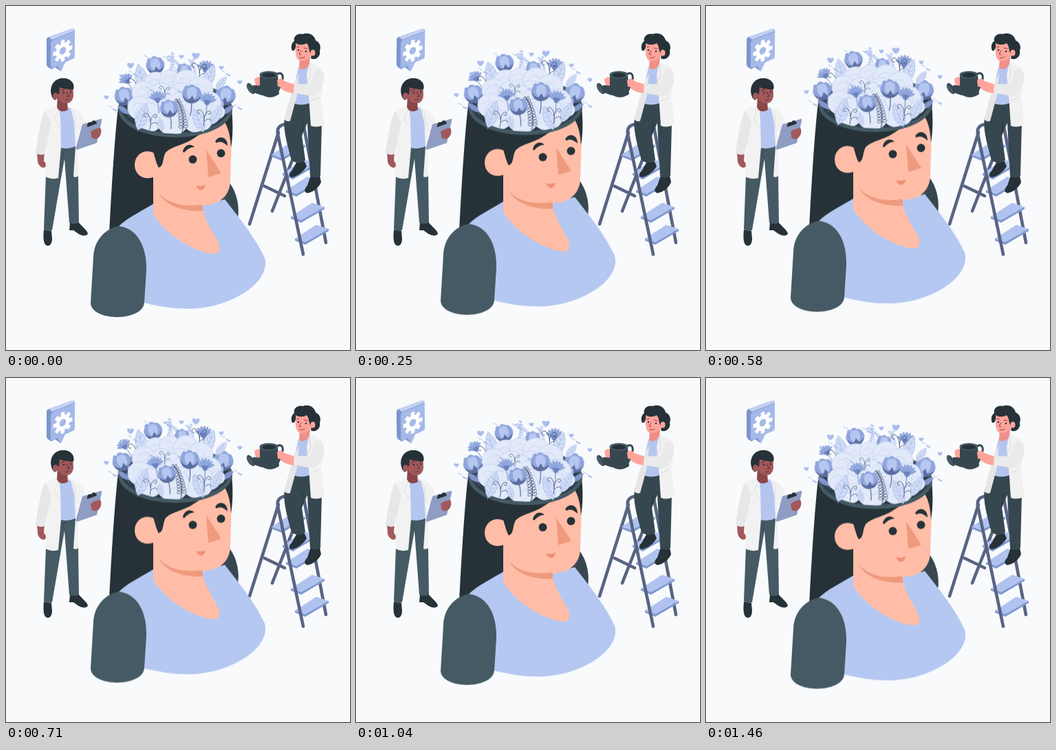
An HTML page that plays this animation: 500 by 500 pixels, repeating every 1.5 s.

```html
<!DOCTYPE html>
<html lang="en">
<head>
<meta charset="utf-8">
<title>Growing mind</title>
<style>
html, body { margin: 0; width: 100%; height: 100%; overflow: hidden; background: #f8fafc; }
svg { display: block; width: 100vw; height: 100vh; }
.line { fill: none; stroke-linecap: round; stroke-linejoin: round; }
#bubble { transform-origin: 80px 64px; }
</style>
</head>
<body>
<svg viewBox="0 0 500 500">
<defs>
  <clipPath id="bowl"><path d="M165 60H326V150A77 35 0 0 1 169 150Z"/></clipPath>
  <g id="tulip">
    <path class="line" d="M0 9Q2 18 0 30" stroke="#566a9c" stroke-width="1.2"/>
    <path d="M-11-7C-17 1-12 10 0 11C12 10 17 1 11-7C8-13 5-9 4-11C0-15-4-13-5-10C-8-13-11-11-11-7Z" fill="#8fa5db"/>
    <path d="M-6-7C-9 1-5 8 0 8C6 8 9 1 6-7C3-11-3-11-6-7Z" fill="#b5c7f0"/>
    <path d="M-12 2C-12 10-5 13 0 13C6 13 12 9 12 2C9 7 6 8 4 8L1 2L-3 8C-6 8-9 7-12 2Z" fill="#5c6d9e"/>
  </g>
  <g id="fan"></g>
  <g id="leaf">
    <path d="M0 20C-13 9-9-9 0-20C9-9 13 9 0 20Z" fill="#d3def7" stroke="#a5b8e6" stroke-width=".8"/>
    <path class="line" d="M0 22V-16M-7 2L0 8L7 2M-6-5L0 1L6-5M-4-11L0-7L4-11M-6 9L0 14L6 9" stroke="#a5b8e6" stroke-width=".7"/>
  </g>
  <g id="fern"></g>
  <g id="sprig"></g>
  <path id="heart" d="M0 4C-8-1-5-7 0-3C5-7 8-1 0 4Z" fill="#a9bcec"/>
  <path id="curl" class="line" d="M0 18C4 4-1-7-6-8C-12-8-10 0-6-2M1 6C3-4 8-8 11-5C13-1 8 1 7-2M2 10C8 5 13 7 12 10" stroke="#3c4b70" stroke-width=".9"/>
  <g id="base">
    <path d="M0 8C-6-4-16-7-20-5C-16 4-9 9 0 8Z" fill="#7f95cc"/>
    <path d="M2 8C-5-3-6-9-3-14C4-8 6 0 2 8Z" fill="#a9bcec"/>
  </g>
</defs>

<!-- speech bubble -->
<g id="bubble">
  <path d="M59 49Q59 46 62 45L96 33Q98 32 100 35L98 74L66 92L61 89Q59 87 59 85Z" fill="#7d94cb"/>
  <path d="M62 45L96 33Q98 32 100 36L67 49Z" fill="#c2d0f3"/>
  <path d="M69 49L97 38Q100 36 100 40V73Q100 76 97 77L86 82L80 95L75 87L68 90Q65 91 65 88V54Q65 51 69 49Z" fill="#a5b9e9"/>
  <path d="M75 87L80 95L77 93L71 89Z" fill="#7d94cb"/>
  <g id="gear" transform="matrix(.9 -.34 0 1 82.5 65)"></g>
</g>

<!-- man with clipboard -->
<g>
  <path d="M55 325L66 327L67 338C67 346 63 350 59 348C54 346 54 336 55 325ZM93 314L106 315C111 321 118 326 119 331C117 335 110 334 105 331L98 326L92 326Z" fill="#263238"/>
  <path d="M58 246L55 324Q60 329 67 326L80 250L85 222L92 315Q99 318 106 315L105 250L101 203L78 205Z" fill="#455a64"/>
  <path class="line" d="M85 222L82 213L89 209" stroke="#37474f" stroke-width="1"/>
  <path d="M45 212L46 226C47 232 53 237 57 234L60 232L55 225L56 212Z" fill="#a1595b"/>
  <path d="M78 152L93 147L103 164L101 204Q90 209 79 206Z" fill="#b4c6f0"/>
  <path d="M94 148C106 150 112 158 116 170L127 183L121 193L104 182L105 247Q102 250 98 248L101 204L99 168Z" fill="#f1f1f1"/>
  <path d="M74 145C62 147 54 152 52 165L43 213Q49 218 56 215L59 200L57 248Q66 253 76 250L80 205L79 165L77 148Z" fill="#f2f2f2"/>
  <path d="M57 152C50 164 47 190 43 213Q49 218 56 215L66 170Z" fill="#e7e7e7"/>
  <path class="line" d="M77 148L70 164L79 178M92 147L100 158L101 180" stroke="#dedede" stroke-width="1"/>
  <path d="M75 130L74 147Q78 157 90 151L89 138Z" fill="#8a4648"/>
  <path d="M74 114L97 111L98 129C98 139 91 143 85 141C77 140 73 132 74 114Z" fill="#a1595b"/>
  <path d="M66 129C62 113 74 104 83 105C94 104 101 114 98 121C90 121 84 121 78 118L77 128L73 130L72 137Q67 135 66 129Z" fill="#263238"/>
  <ellipse cx="72" cy="131" rx="4" ry="5" fill="#a1595b"/>
  <path class="line" d="M81 123L85 121M92 121L96 122M88 125L92 131L89 132M86 137L91 136" stroke="#5f2f33" stroke-width="1.1"/>
  <circle cx="84" cy="126" r="1.2" fill="#263238"/><circle cx="94" cy="125" r="1.2" fill="#263238"/>
  <path d="M111 172L138 164Q140 164 139 167L132 199L103 209Q101 208 102 205Z" fill="#8f9dc4"/>
  <path d="M118 173L120 169L124 169L127 166L131 168L132 171L118 176Z" fill="#263238"/>
  <path d="M123 183C127 179 133 178 137 177C140 182 138 190 132 193C127 194 123 192 124 188Z" fill="#a1595b"/>
</g>

<!-- ladder -->
<g class="line" stroke="#596482" stroke-width="4.6">
  <path d="M396 184L354 317M424 204L387 298M376 262L405 276"/>
  <path d="M430 160L465 344" />
</g>
<g id="steps"></g>
<path class="line" d="M432 361L395 186Q393 174 405 172L430 165" stroke="#596482" stroke-width="4.6"/>

<!-- woman with watering can -->
<g>
  <path d="M424 224L434 226L437 233C434 239 425 247 416 249C410 248 411 243 415 240ZM443 246L456 247L458 256C455 264 446 271 438 272C432 270 434 265 438 261Z" fill="#263238"/>
  <path d="M417 137L405 163C402 177 409 203 415 224Q426 232 435 224L430 188L438 170L442 247Q449 252 457 247L459 170L450 140Z" fill="#37474f"/>
  <path class="line" d="M430 188L432 168" stroke="#263238" stroke-width="1"/>
  <path d="M425 89L441 83L444 140Q428 147 416 140L420 112Z" fill="#b4c6f0"/>
  <path d="M420 110L411 139L404 165Q409 169 413 167L423 130L426 98Z" fill="#e6e6e6"/>
  <path d="M441 82C455 86 462 91 463 103L458 132L463 172Q452 178 443 174L440 130L437 100Z" fill="#f1f1f1"/>
  <path d="M398 108C406 108 414 113 421 114L421 126C411 128 402 122 397 118Z" fill="#ffa49b"/>
  <path d="M419 113L442 114L449 94C455 88 464 95 462 107C460 121 453 130 444 131L418 126Z" fill="#eaeaea"/>
  <path class="line" d="M441 83L443 101L436 114M455 133L444 138" stroke="#d9d9d9" stroke-width="1"/>
  <path d="M427 74L426 90Q434 96 441 84L443 66Z" fill="#f08e88"/>
  <path d="M421 55C420 67 421 79 428 80C437 81 444 75 446 63L443 52Z" fill="#ffa49b"/>
  <path d="M416 65C413 58 416 53 419 51C417 44 425 39 431 41C440 37 449 43 450 50C457 53 458 60 456 65C458 73 450 80 443 76L444 70C439 66 442 60 437 54C432 57 426 57 421 54C422 60 420 66 416 65Z" fill="#263238"/>
  <ellipse cx="446" cy="68" rx="3.5" ry="4.5" fill="#ffa49b"/>
  <path class="line" d="M423 60L426 59M433 61L438 62M429 65L426 70L429 71M427 75Q431 77 434 74" stroke="#8c3f40" stroke-width="1"/>
  <circle cx="425" cy="64" r="1.2" fill="#263238"/><circle cx="436" cy="66" r="1.2" fill="#263238"/>
  <path d="M361 107C364 102 370 102 374 107L372 120L364 120Z" fill="#ffa49b"/>
  <path class="line" d="M394 99C401 95 405 101 400 112L396 122" stroke="#37474f" stroke-width="3"/>
  <path d="M369 100V127Q383 138 397 128L395 100Z" fill="#37474f"/>
  <path d="M372 116L359 115L358 125L372 130Z" fill="#37474f"/>
  <ellipse cx="356" cy="120" rx="4" ry="9" transform="rotate(-32 356 120)" fill="#37474f"/>
  <ellipse cx="354.500" cy="121" rx="3" ry="7.500" transform="rotate(-32 354 121)" fill="#455a64"/>
  <ellipse cx="382" cy="100" rx="13.500" ry="5.500" fill="#455a64"/>
  <ellipse cx="382" cy="100.500" rx="10" ry="3.600" fill="#263238"/>
  <path d="M394 108Q399 103 404 108L404 119L395 117Z" fill="#ffa49b"/>
</g>

<!-- bust -->
<g id="bust">
  <path d="M324 256C334 268 340 289 337 308L310 286Z" fill="#37474f"/>
  <path d="M163 148C159 180 154 250 150 330L220 330V160Z" fill="#263238"/>
  <path d="M162 322C178 306 198 298 215 287L286 290L318 281C334 302 360 332 376 366C386 402 325 440 265 440Q232 440 195 430Z" fill="#b5c8f1"/>
  <path d="M214 230V303C236 338 282 360 302 360C314 359 312 348 304 335C294 317 287 305 285 290L284 240Z" fill="#ffbda7"/>
  <path d="M222 272C236 288 262 293 286 288V298C258 299 233 291 222 272Z" fill="#ee9a7d"/>
  <path d="M214 160H324C327 185 328 200 327 222L326 256C324 282 302 291 284 289C256 288 228 280 214 252Z" fill="#ffbda7"/>
  <path d="M217 215C205 206 187 214 187 231C187 248 205 255 217 247Z" fill="#ffbda7"/>
  <path d="M163 150C180 190 214 190 214 212C217 222 219 230 222 235C230 232 227 222 232 213C242 203 258 203 275 191C289 181 304 176 314 164C320 170 326 182 327 206C330 190 330 170 328 150Z" fill="#263238"/>
  <path d="M257 212C258 203 267 198 274 205C267 205 263 209 259 213ZM304 197C309 187 322 190 322 203C316 198 311 196 306 199Z" fill="#263238"/>
  <circle cx="271.500" cy="223" r="6" fill="#263238"/>
  <circle cx="312.500" cy="214" r="6" fill="#263238"/>
  <path d="M291 209L313 243L294 249Z" fill="#ef9a7c"/>
  <path d="M276 261Q283 263 290 260C289 266 285 269 281 267Q278 265 276 261Z" fill="#ef8f74"/>
  <path d="M123 432L127 365C128 340 145 323 164 320C191 323 205 350 204 384L201 431C199 459 125 459 123 432Z" fill="#455a64"/>

  <ellipse cx="246" cy="150" rx="83" ry="41" fill="#455a64"/>
  <ellipse cx="246" cy="149" rx="78" ry="36" fill="#2f3d46"/>
  <g id="back"></g>
  <g id="brain" clip-path="url(#bowl)"></g>
  <g id="front"></g>
</g>
</svg>
<script>
const $ = id => document.getElementById(id);
const range = n => [...Array(n).keys()];
const fill = (id, parts) => { $(id).innerHTML = parts.join(''); };

// small motifs
fill('fan', [
  '<path class="line" d="M0 7L1 26" stroke="#7388c0" stroke-width="1.1"/>',
  ...range(7).map(i => `<ellipse cy="-5" rx="2.600" ry="10" transform="translate(0 5) rotate(${i * 22 - 66})" fill="#8fa6dc"/>`),
  '<path d="M-6 3Q0 0 6 3L0 11Z" fill="#6c82bd"/>'
]);
fill('fern', [
  '<path class="line" d="M4 28C9 10 5-14-5-24" stroke="#3c4b70" stroke-width="1.1"/>',
  ...range(10).map(i => {
    const x = 6 - i * i * .11, y = 19 - i * 4.5, r = 6 - i * .35;
    return `<path class="line" d="M${x} ${y}q${r}-6 ${r + 1}-1q-2 4-${r + 1} 1q-${r}-5-${r + 1} 0q1 4 ${r + 1} 0" stroke="#3c4b70" stroke-width=".8"/>`;
  })
]);
fill('sprig', [
  '<path class="line" d="M4 22Q4 0-5-14" stroke="#b3c4ee" stroke-width="1"/>',
  ...range(16).map(i => {
    const k = i >> 1, side = i % 2 ? 1 : -1;
    return `<ellipse cx="${4 - k * k * .18 + side * 4}" cy="${11 - k * 3.6}" rx="3" ry="1.500" transform="rotate(${side * -28})" fill="#bccbf1"/>`;
  })
]);
fill('gear', [
  ...range(8).map(i => `<rect x="-3" y="-15.500" width="6" height="8" rx="1.200" transform="rotate(${i * 45})" fill="#fff"/>`),
  '<circle r="11" fill="#fff"/><circle r="5.300" fill="#a5b9e9"/>'
]);

// ladder treads: left x, left y
fill('steps', [[386, 216], [402, 243], [407, 268], [414, 306], [420, 338]].map(([x, y]) =>
  `<path d="M${x} ${y}L${x + 31} ${y - 20}L${x + 49} ${y - 14}L${x + 15} ${y + 5}Z" fill="#b0c3f0"/>
   <path d="M${x} ${y}L${x + 15} ${y + 5}L${x + 49} ${y - 14}V${y - 11}L${x + 15} ${y + 9}L${x} ${y + 3}Z" fill="#8199d1"/>`));

// brain folds: x, y, radius
const folds = [[218, 114, 18], [238, 108, 15], [262, 112, 19], [282, 122, 19], [200, 126, 17],
  [294, 143, 19], [194, 148, 17], [226, 132, 20], [254, 134, 22], [208, 162, 21], [278, 160, 24], [242, 164, 24], [308, 154, 10]];
fill('brain', folds.map(([x, y, r]) =>
  `<circle cx="${x}" cy="${y}" r="${r}" fill="#e2e9f9" stroke="#c8d5f3" stroke-width="1"/>
   <path class="line" d="M${x - r * .6} ${y - 2}q${r * .5}-${r * .6} ${r} 0q-2 ${r * .4}-${r * .5} ${r * .3}" stroke="#cbd7f3" stroke-width="1"/>`));

// plants: motif, x, y, angle, size, sways
const place = ([kind, x, y, turn = 0, size = 1, sway = 0]) =>
  `<g${sway ? ` class="sway" style="transform-origin:${x}px ${y + 55}px"` : ''}><use href="#${kind}" transform="translate(${x} ${y}) rotate(${turn}) scale(${size})"/></g>`;
const dots = (x, y) => range(6).map(i =>
  `<circle cx="${x + (i * 7) % 12 - 5}" cy="${y + (i * 5) % 9 - 4}" r="${.8 + i % 2 * .4}" fill="#a9bcec"/>`);

fill('back', [
  ...[['sprig', 243, 86, 0, 1, 1], ['tulip', 217, 86, -8, 1, 1], ['fan', 291, 88, 8, .95, 1],
    ['fan', 174, 106, -30, .8, 1], ['sprig', 268, 90, 25, .8, 1], ['curl', 280, 91],
    ['curl', 188, 112, -10], ['tulip', 259, 94, 5, .8, 1], ['leaf', 197, 105, -14, 1.05],
    ['leaf', 295, 103, 22, .95], ['tulip', 172, 131, -14, 1.05, 1], ['tulip', 319, 130, 14, 1.1, 1],
    ['leaf', 313, 112, 38, .6], ['base', 181, 150, 0, .95],
    ['heart', 181, 87], ['heart', 146, 133, 0, .7], ['heart', 255, 74, 0, .7],
    ['heart', 276, 73, 0, 1.1], ['heart', 340, 111, 0, .7], ['heart', 313, 90, 0, .7], ['heart', 168, 102, 0, .6]].map(place),
  '<g transform="matrix(-1 0 0 1 494 0)">' + place(['base', 182, 150, 0, .95]) + '</g>',
  ...[[233, 77], [154, 149], [336, 147], [319, 98], [184, 98], [206, 76]].flatMap(p => dots(...p))
]);
fill('front', [
  ['leaf', 198, 161, 18, 1], ['leaf', 280, 166, -22, .9], ['leaf', 225, 172, -12, .5], ['leaf', 306, 158, 28, .8],
  ['curl', 209, 163, 0, .9], ['curl', 287, 158, 0, .9], ['curl', 230, 122, 0, .7],
  ['fern', 252, 158, 0, .95, 1], ['fan', 220, 132, -4, .9, 1], ['fan', 293, 135, 8, .95, 1],
  ['tulip', 270, 128, 4, 1.05, 1], ['tulip', 237, 149, -6, .98, 1]
].map(place).concat(dots(208, 121), dots(248, 122)));

// motion
const loop = (el, frames) => el.animate(frames, { duration: 1500, iterations: Infinity, easing: 'linear' });
const spin = deg => ({ transform: `rotate(${deg}deg)` });
loop($('bust'), [0, -10, 0].map(y => ({ transform: `translateY(${y}px)` })));
document.querySelectorAll('.sway').forEach(el => loop(el, [0, -3.5, 0].map(spin)));
loop($('bubble'), [spin(0), { ...spin(1), offset: .25 }, { ...spin(-1), offset: .75 }, spin(0)]);
</script>
</body>
</html>
```
